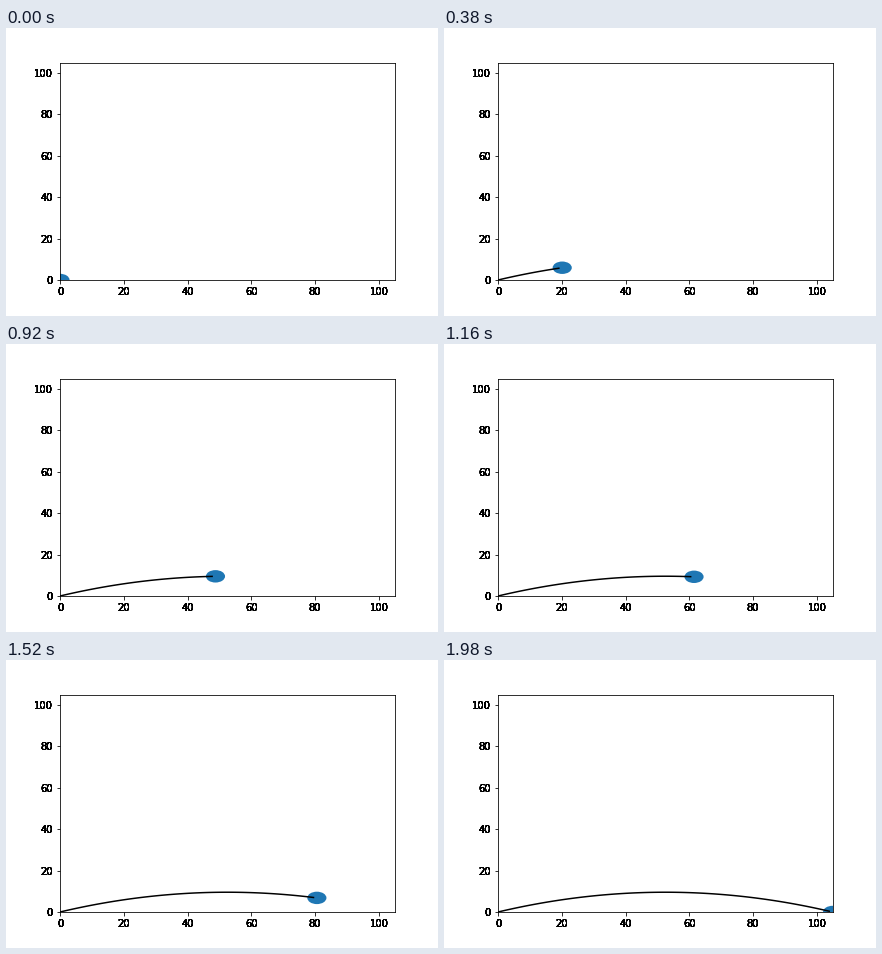
Recreate the animation shown at these times as a matplotlib script. Size 432x288 px, loop 2000 ms.

```python
import numpy as np
import matplotlib.pyplot as plt
from matplotlib.animation import FuncAnimation

FRAMES = 100
LIMIT = 105
LABEL_PASSES = 12  # repeated passes darken the antialiased label edges

# Projectile flight
SPEED, ANGLE, G = 40, np.radians(20), 9.8
flight = 2 * SPEED * np.sin(ANGLE) / G
t = np.linspace(0, flight, FRAMES)
x = SPEED * np.cos(ANGLE) * t
y = SPEED * np.sin(ANGLE) * t - G * t**2 / 2

plt.rcParams.update({"font.family": "DejaVu Sans", "font.size": 10})
fig = plt.figure(figsize=(6, 4), dpi=72, facecolor="white")
ax = fig.add_axes((0.125, 0.125, 0.775, 0.755), xlim=(0, LIMIT), ylim=(0, LIMIT))

ticks = range(0, 101, 20)
ax.set_xticks(ticks, [])
ax.set_yticks(ticks, [])


def add_labels(placement, position):
    transform, va, ha = placement
    for value in ticks:
        for _ in range(LABEL_PASSES):
            ax.text(*position(value), str(value), transform=transform, va=va, ha=ha)


add_labels(ax.get_xaxis_text1_transform(7), lambda v: (v, 0))
add_labels(ax.get_yaxis_text1_transform(7), lambda v: (0, v))

ball = ax.add_patch(plt.Circle((0, 0), 3, color="C0", lw=0))
trail, = ax.plot([], [], color="black", lw=1.5)


def update(i):
    ball.center = x[i], y[i]
    trail.set_data(x[:i], y[:i])
    return ball, trail


anim = FuncAnimation(fig, update, frames=FRAMES, interval=20, repeat=True,
                     repeat_delay=0, blit=False)
plt.show()
```
